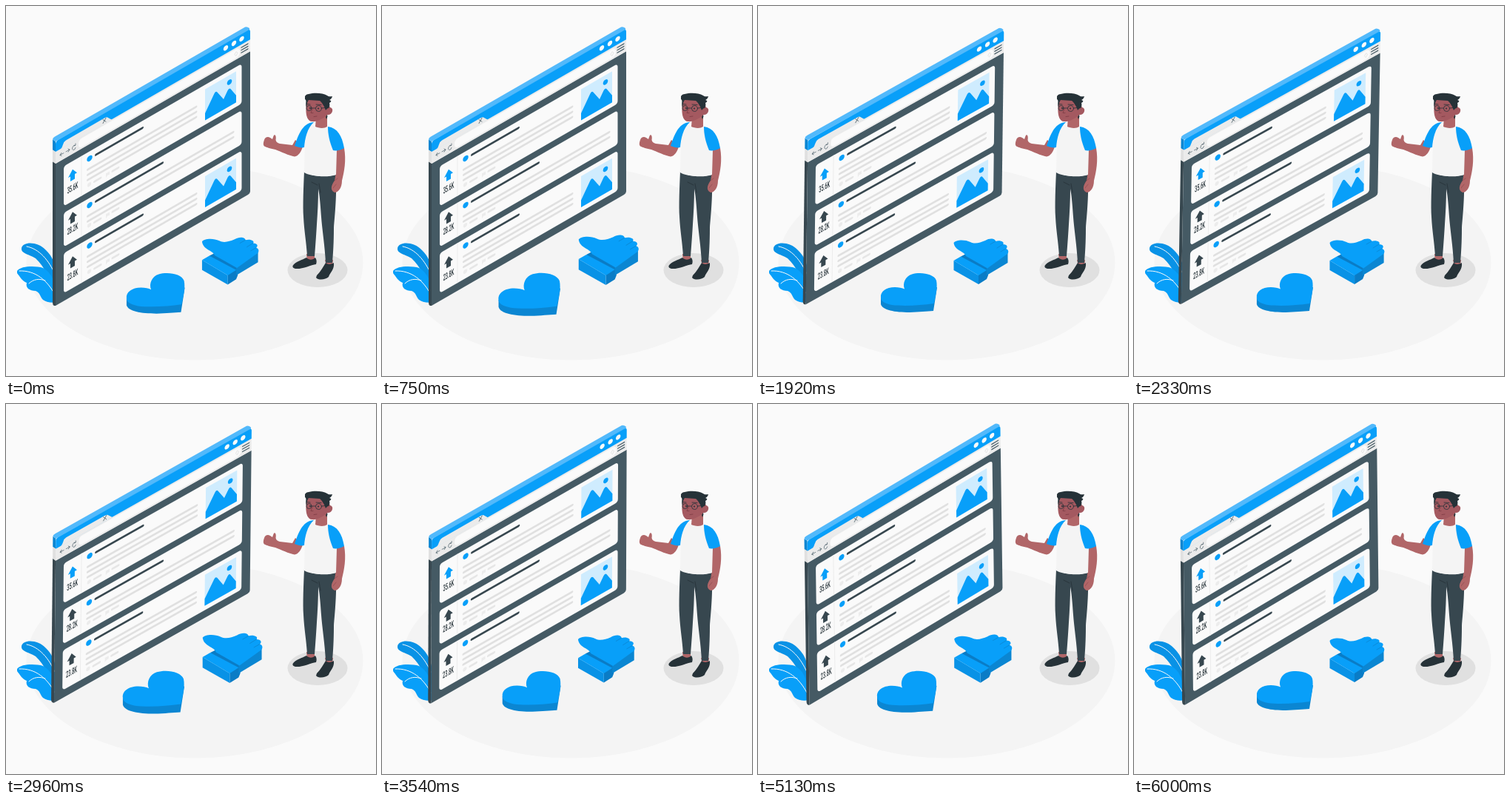
An HTML page that plays this animation: 500 px wide and 500 px high, repeating every 6040 ms.

```html
<!DOCTYPE html>
<html lang="en">
<head>
<meta charset="utf-8">
<title>Upvotes</title>
<style>
html, body { margin: 0; height: 100%; overflow: hidden; background: #fafafa; }
svg { display: block; width: 100vw; height: 100vh; }
.blue { fill: #089ff9; }
.mid { fill: #0992e6; }
.deep { fill: #0b86d2; }
.pale { fill: #cfecfe; }
.dark { fill: #263238; }
.slate { fill: #37474f; }
.white { fill: #fafafa; }
.skin { fill: #b16668; }
.line { fill: none; stroke-linecap: round; stroke-linejoin: round; }
text { font: 500 12px Roboto, "Liberation Sans", sans-serif; text-anchor: middle; }
</style>
</head>
<body>
<svg viewBox="0 0 500 500">
  <ellipse cx="255" cy="347" rx="227.5" ry="131.5" fill="#f4f4f4"/>
  <ellipse cx="421" cy="357" rx="40.5" ry="23" fill="#e0e0e0"/>

  <g id="plant">
    <path class="mid" d="M21 327C23 318 43 318 54 330C62 338 66 346 68 360V384C60 371 52 352 40 341C31 335 20 335 21 327Z"/>
    <path class="blue" d="M15 358C20 351 40 351 50 354C61 360 68 372 69 400C62 402 54 400 50 397C46 393 46 387 40 385C32 385 26 381 28 374C22 372 19 366 15 361Z"/>
    <path class="line" stroke="#fafafa" d="M28 325C45 328 58 344 66 362M18 358C40 357 56 371 66 390M31 375C37 369 45 368 53 371"/>
  </g>

  <g id="win">
    <path d="M63 180.5L67 183V197L63 194.500Z" class="deep"/>
    <path d="M63 194.500L67 197V213L63 210.500Z" fill="#e0e0e0"/>
    <path d="M63 210.500L67 213V405L65 405Q63 404 63 401Z" class="slate"/>
    <path d="M67 183L63 180.500Q63 178 66 176.500L323 28.500Q326 27.500 329 30V33Z" fill="#52b9fb"/>
    <g id="face" transform="matrix(1 -.577 0 1 67 183)">
      <path d="M0 30H263V219Q263 222 260 222H0Z" fill="#455a64"/>
      <path d="M0 14H263V30H0Z" fill="#ebebeb"/>
      <path class="blue" d="M0 3Q0 0 3 0H260Q263 0 263 3V14H0Z"/>
      <path d="M7 14.500Q9 13 10 10Q11 6.500 14 6.500H65Q69 6 71 9L76 14.500Z" fill="#ebebeb"/>
      <rect class="white" x="31" y="16" width="218" height="12" rx="5"/>
      <g class="white">
        <circle cx="230" cy="6.500" r="3.200"/>
        <circle cx="241" cy="6.500" r="3.200"/>
        <circle cx="251.500" cy="6.500" r="3.200"/>
      </g>
      <g class="line" stroke="#455a64">
        <path d="M251 18H260M251 21.500H260M251 25H260" stroke-width="1.300"/>
        <path d="M64 7.500L68 12.500M68 7.500L64 12.500" stroke-width=".7"/>
        <path d="M11 22H6M8 20L6 22L8 24M14 22H19M17 20L19 22L17 24M26.500 20.500A2.300 3 0 1 0 27 24M27 18.500V20.500H25" stroke-width=".6"/>
      </g>
      <path class="line" d="M242 22L244 19.500L246 22L244 25Z" stroke="#e0e0e0" stroke-width=".7"/>
    </g>
  </g>

  <g id="likes">
    <path class="deep" d="M166 394V403C168 411 185 414 205 414C218 413.500 228 412.500 237 412L242 380Z"/>
    <path class="blue" d="M166 394C165 386 173 380 185 380C190 380 195 381 198 382.500C195 375 199 365 208 362.500C220 359 238 362 241 371C243 380 240 392 237.500 402C220 404.500 198 406 181 404C171 402 166 399 166 394Z"/>
    <path d="M274 338.500L281 335L311 352V364L309 369L298 376V364Z" fill="#0a7cc6"/>
    <path class="mid" d="M264.500 344V357L298 376V364Z"/>
    <path class="blue" d="M264.500 344L274 338.500L309 357L298 364Z"/>
    <path class="deep" d="M309 353L337.500 331V347L309 364Z"/>
    <path class="blue" d="M264.500 320C267 316 279 315 287 319C293 322 300 320 307 317C313 313 321 314 321 318C327 316 334 319 331 322C337 322 338 326 335 328C339 329 339 333 337 335L310 354.500L281 338C279 331 266 331 264.500 320Z"/>
    <path class="line" d="M321 318L314 322M331 322L323 327M335 328L328 332" stroke="#0b86d2" stroke-width=".8"/>
  </g>

  <g id="man">
    <path class="skin" d="M406 335H417V345H407ZM431 343H442L441 352H433Z"/>
    <path class="dark" d="M387.500 351C391 345 401 343 406 340C410 344 415 343 418 340C420 343 420 346 419 349C412 350 400 356 391 355C388 354 387 353 387.500 351ZM420 364C425 359 429 352 432 347C435 350 440 349 443 347C444 356 438 360 436 366C432 370 422 371 419 367Z"/>
    <path class="slate" d="M403 223C412 231 434 232 446 228C447 262 444 285 443 300C443 320 442 335 441 347L432 347C431 325 427 300 426 285C425 270 424 257 422 247C422 262 421 280 420 295C419 312 418 325 417 338L407 338C406 320 403 305 402 285C401 270 402 245 403 223Z"/>
    <path class="line" d="M425 252L423 240M413 238L421 242" stroke="#263238" stroke-width=".8"/>
    <path class="skin" d="M401 190C399 197 395 203 390 203.500C382 202 372 197 364 194C358 193 352 191 349 189.500C347 187 348 184 349 181C350 177 354 176 357 178L360 180C361 178 361 175 363 174C365 175 365 178 364.500 181C365 184 367 185 370 186L387 188L391 181Z"/>
    <path class="skin" d="M443 193L457 192C460 209 457 224 454 236C454 246 449 252 444 252C438 249 439 243 444 236C447 224 446 209 443 193Z"/>
    <path class="line" d="M444 236L448 233M442 246L446 241" stroke="#934d53" stroke-width=".8"/>
    <path d="M411 159C419 165 428 165 437 163C444 167 446 180 447 195L446 228C434 231 412 231 403 225C404 205 402 175 411 159Z" fill="#f4f4f4"/>
    <path class="blue" d="M416 157C403 158 397 168 390 189C395 191 399 192 403 191C404 179 407 165 416 157ZM435 163C448 165 454 175 457 192C452 195 446 196 442 195C437 183 435 173 435 163Z"/>
    <path class="skin" d="M419 150L434 147V163C430 166 422 165 418 163Z"/>
    <path d="M407 126C404 140 405 155 413 156C420 157 426 153 431 150C434 149 434 148 434 147C441 148 444 138 438 137L433 127Z" fill="#a45960"/>
    <path class="dark" d="M404 122C405 120 407 119 409 119C417 117 428 117.500 434 121C436 123 439 122 441 122C440 125 439 126 437 127C441 128 439 130 437 131C438 134 437 136 436 138C434 138 433 140 432 141L430 136C428 133 427 130 424 128L409 127C406 131 407 135 406 137C404 131 407 128 404 126ZM434 147C435 149 434 151 433 153L432 150Z"/>
    <g class="line" stroke="#263238" stroke-width=".8">
      <circle cx="409.500" cy="138" r="3.500"/>
      <circle cx="422.500" cy="138.500" r="4"/>
      <path d="M413 138H418.500M426.500 138L436 137M407 132.500L411 133M419 133L426 133.500"/>
      <path d="M414 139L412 144.500L415 144.500M416 149.500L420 149" stroke="#7d3c45"/>
    </g>
    <circle cx="411" cy="138" r="1" class="dark"/>
    <circle cx="422" cy="138.500" r="1" class="dark"/>
  </g>
</svg>
<script>
const $ = id => document.getElementById(id);
const LOOP = 6040;

// One feed entry, in the flat coordinates of the window face.
function card({ y, h, votes, hot, title, lines, end, image }) {
  const mid = y + h / 2, below = y + h - 9.5;
  const arrow = mid - (image ? 8.5 : 10);
  const rows = Array.from({ length: lines }, (_, i) =>
    `M43.500 ${y + 23 + i * 7}H${end}`).join("");
  const picture = `<g transform="translate(202 ${y + 6})">
    <path class="pale" d="M0 0H42V42H0Z"/>
    <circle class="blue" cx="33" cy="9.500" r="3.300"/>
    <path class="blue" d="M0 42V32.500L12.500 13Q14.500 10.500 16.500 13.500L25 28L30.500 19.500Q32.500 16.500 34.500 19.500L42 32.500V42Z"/></g>`;
  return `<rect class="white" x="11" y="${y}" width="240.500" height="${h}" rx="4"/>
    <path d="M35 ${y}V${y + h}" stroke="#ececec"/>
    <path class="${hot ? "blue" : "slate"}" transform="translate(23 ${arrow})"
      d="M0 -7.500L6 .5H3V7H-3V.5H-6Z"/>
    <text class="dark" transform="translate(23 ${mid + (image ? 13 : 9.5)}) scale(.47 1)">${votes}</text>
    <circle class="blue" cx="46" cy="${y + 9.5}" r="3.700"/>
    <g class="line" stroke-width="3">
      <path d="M54.500 ${y + 9.5}H${title}" stroke="#37474f"/>
      <path d="${rows}" stroke="#e0e0e0"/>
      <path d="M52.500 ${below}H61M77 ${below}H85" stroke="#e6e6e6"/>
    </g>
    <g fill="#ececec"><circle cx="45.500" cy="${below}" r="2.700"/>
      <path d="M68 ${below - 2}H73V${below + 2}H70L68 ${below + 4}Z"/></g>
    ${image ? picture : ""}`;
}

const face = $("face");
face.innerHTML += [
  { y: 40, h: 54, votes: "35.6K", hot: true, title: 117.5, lines: 3, end: 190, image: true },
  { y: 103, h: 46, votes: "28.2K", title: 144.5, lines: 2, end: 240 },
  { y: 157.5, h: 54, votes: "23.8K", title: 117.5, lines: 3, end: 190, image: true }
].map(card).join("");

// The CSS "ease" curve, cubic-bezier(.25, .1, .25, 1).
function ease(x) {
  const bez = (a, b, s) => 3 * a * s * (1 - s) ** 2 + 3 * b * s * s * (1 - s) + s ** 3;
  let lo = 0, hi = 1;
  for (let i = 0; i < 20; i++) {
    const m = (lo + hi) / 2;
    if (bez(.25, .25, m) < x) lo = m; else hi = m;
  }
  return bez(.1, 1, lo);
}

function track(keys, p, curve = x => x) {
  const i = Math.max(1, keys.findIndex(k => k[0] >= p));
  const [a, from] = keys[i - 1], [b, to] = keys[i];
  return from + (to - from) * curve((p - a) / (b - a));
}

const BEAT = [[0, 1], [.1, 1.1], [.3, 1], [.415, 1], [.515, 1.1], [.7, 1], [1, 1]];
const SWAY = [[0, 0], [.25, 1], [.75, -1], [1, 0]];

function draw(t) {
  const beat = t < 1275 ? t + 35 : (t - 1275) % 1575;
  const size = track(BEAT, beat / 1575, ease);
  const angle = track(SWAY, Math.max(0, t - 800) / 6200);
  $("likes").setAttribute("transform", `translate(252 365) scale(${size}) translate(-252 -365)`);
  $("win").setAttribute("transform", `rotate(${angle} 196 216)`);
}

const start = performance.now();
function tick() {
  draw((performance.now() - start) % LOOP);
  requestAnimationFrame(tick);
}
tick();
</script>
</body>
</html>
```
